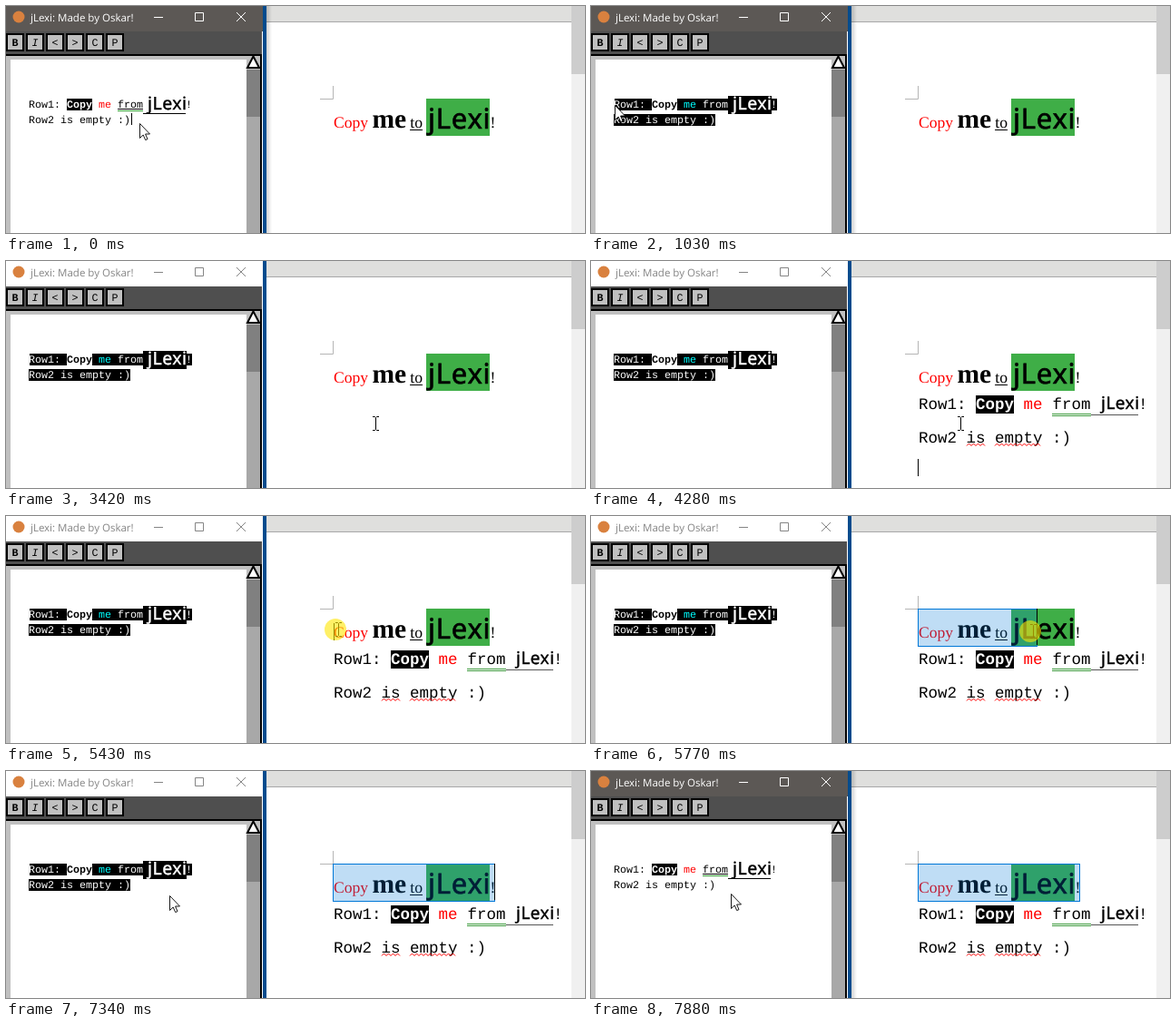
Recreate the animation shown at these times as an HTML page. Size 638x250 px, loop 8 s.

```html
<!DOCTYPE html>
<html lang="en">
<head>
<meta charset="utf-8">
<title>Copy and paste demo</title>
<style>
  html, body { margin: 0; width: 100%; height: 100%; overflow: hidden; background: #fff; }
  svg { display: block; width: 638px; height: 250px; text-rendering: geometricPrecision; }
  text { white-space: pre; }
  .ui { font-family: "Open Sans", sans-serif; font-size: 11.5px; }
  .mono { font-family: "Liberation Mono", monospace; }
  .small { font-size: 11.667px; }
  .large { font-size: 17.5px; }
  .serif { font-family: "Liberation Serif", serif; font-size: 17.6px; }
  .big { font-size: 29.5px; }
  .logo { font-family: "Noto Sans", sans-serif; stroke: #000; stroke-width: .02em; stroke-linejoin: round; letter-spacing: .025em; }
  .b { font-weight: bold; }
  .invert { fill: #fff; mix-blend-mode: difference; }
</style>
</head>
<body>
<svg id="stage" viewBox="0 0 638 250" xmlns="http://www.w3.org/2000/svg">
  <defs>
    <linearGradient id="fade">
      <stop offset="0" stop-color="#000" stop-opacity=".18"/>
      <stop offset="1" stop-color="#000" stop-opacity="0"/>
    </linearGradient>
  </defs>
  <rect width="638" height="250" fill="#fff"/>

  <!-- document window -->
  <rect x="287" width="336" height="17" fill="#dfdfdd"/>
  <rect x="287" y="17" width="336" height="1" fill="#a8a8a8"/>
  <rect x="623" width="15" height="250" fill="#f0f0f0"/>
  <rect x="623" width="15" height="75" fill="#cdcdcd"/>
  <path d="M360.5 88V102.5H346" fill="none" stroke="#b5b5b5"/>
  <rect x="463" y="102" width="70" height="41" fill="#3fae47"/>
  <g id="line">
    <text x="361" y="134" class="serif" fill="#f00">Copy</text>
    <text x="403.5" y="134" class="serif b big">me</text>
    <text x="445.3" y="134" class="serif">to</text>
    <text x="465" y="135" class="logo" font-size="31">jLexi</text>
    <text x="533.5" y="134" class="serif">!</text>
  </g>
  <rect x="445" y="136" width="14" height="1"/>
  <g id="pasted">
    <rect x="424" y="148" width="42" height="20"/>
    <g class="mono large">
      <text x="361" y="163">Row1:</text>
      <text x="424" y="163" class="b" fill="#fff">Copy</text>
      <text x="476.5" y="163" fill="#f00">me</text>
      <text x="508.5" y="163">from</text>
      <text x="603" y="163">!</text>
      <text x="361" y="200">Row2 is empty :)</text>
    </g>
    <text x="562" y="163" class="logo" font-size="19">jLexi</text>
    <path d="M508 168.5H551M508 170.5H551" stroke="#3c9a3c"/>
    <path d="M551 169.5H603" stroke="#555"/>
  </g>
  <g id="squiggles" fill="none" stroke="#f00"></g>
  <rect id="mark" y="102.5" height="41" fill="#0078d7" fill-opacity=".25" stroke="#0078d7"/>
  <rect id="docCaret" width="1"/>

  <!-- editor window -->
  <rect id="shadow" x="287" width="6" height="250" fill="url(#fade)"/>
  <rect x="283" width="4" height="250" fill="#004b8d"/>
  <rect id="titleBar" width="283" height="28"/>
  <circle cx="14" cy="12" r="6.5" fill="#d9813f"/>
  <text id="titleText" class="ui" x="27" y="16.5">jLexi: Made by Oskar!</text>
  <path id="controls" d="M163 12.5H173M208.5 7.5H217.5V16.5H208.5ZM254 7L264 17M264 7L254 17" fill="none"/>
  <rect y="28" width="282" height="25" fill="#4f4f4f"/>
  <g id="buttons"></g>
  <rect y="53" width="282" height="197"/>
  <rect y="55" width="280" height="195" fill="#c0c0c0"/>
  <rect x="5" y="59" width="260" height="191" fill="#fff"/>
  <rect x="265" y="70" width="15" height="52" fill="#808080"/>
  <rect x="265" y="122" width="15" height="128" fill="#a8a8a8"/>
  <path d="M272.5 55.5L279 68H266Z" fill="#fff" stroke="#000" stroke-width="2"/>
  <rect x="67" y="102" width="28" height="13"/>
  <g class="mono small">
    <text x="25" y="112">Row1:</text>
    <text x="67" y="112" class="b" fill="#fff">Copy</text>
    <text x="102" y="112" fill="#f00">me</text>
    <text x="123" y="112">from</text>
    <text x="198" y="112">!</text>
    <text x="25" y="129">Row2 is empty :)</text>
  </g>
  <text x="156" y="114" class="logo" font-size="19.5">jLexi</text>
  <g id="underlines">
    <path d="M123 113.5H151M151 118.5H198" stroke="#000"/>
    <path d="M123 115.5H151" stroke="#2f9a2f"/>
  </g>
  <g id="inverted"></g>
  <rect id="caret" class="invert" width="1" height="13"/>

  <!-- pointer -->
  <g id="pointer">
    <path id="arrow" d="M.5 .5V16.5L4.2 13 6.7 18.6 9 17.6 6.6 12H11.5Z" fill="#fff" stroke="#000" stroke-width=".9"/>
    <path id="beam" d="M0 -7.5H2.5L3.5 -6.5 4.5 -7.5H7M3.5 -6.5V6.5M0 7.5H2.5L3.5 6.5 4.5 7.5H7" fill="none" stroke="#000"/>
    <circle id="press" r="12" fill="#ffe600" fill-opacity=".6"/>
  </g>
</svg>
<script>
const LOOP = 8000;
const COPY_FOCUS_LOST = 2890, PASTE = 4150, DRAG = 5430, DROP = 6250, BACK = 7610;
const $ = id => document.getElementById(id);

function set(el, attrs) {
  for (const k in attrs) el.setAttribute(k, attrs[k]);
}
function add(parent, tag, attrs, text = "") {
  const el = document.createElementNS("http://www.w3.org/2000/svg", tag);
  set(el, attrs);
  el.textContent = text;
  return parent.appendChild(el);
}
const show = (el, on) => el.setAttribute("visibility", on ? "visible" : "hidden");
const within = (t, ...spans) => spans.some(([a, b]) => t >= a && t < b);
const blink = (t, since, half) => Math.floor((t - since) / half) % 2 === 0;

// toolbar
[..."BI<>CP"].forEach((label, i) => {
  const x = 1 + i * 22;
  add($("buttons"), "rect", { x, y: 31, width: 18, height: 18, fill: "#c0c0c0", stroke: "#000", "stroke-width": 2 });
  add($("buttons"), "text", {
    x: x + 9, y: 44, "text-anchor": "middle", class: "mono small",
    "font-weight": label === "B" ? "bold" : "normal", "font-style": label === "I" ? "italic" : "normal"
  }, label);
});

// spelling marks
function squiggle(from, to) {
  let d = `M${from} 203.5`;
  for (let x = from + 2.5, up = true; x <= to; x += 2.5, up = !up) d += `L${x} ${up ? 201 : 203.5}`;
  add($("squiggles"), "path", { d });
}
squiggle(414, 434);
squiggle(445, 497);

// pointer moves: start, end, x, y
const moves = [
  [70, 610, 29, 109], [829, 830, 26, 109], [1030, 1380, 103, 40],
  [2190, 2460, 303, 155], [2460, 2800, 404, 179],
  [4770, 5400, 363, 125], [DRAG, DROP, 546, 128],
  [6780, 7200, 260, 143], [7200, 7480, 154, 135]
];
function pointerAt(t) {
  let x = 147, y = 129;
  for (const [start, end, toX, toY] of moves) {
    if (t < start) break;
    const p = 1 - (1 - Math.min(1, (t - start) / (end - start))) ** 2;
    x += (toX - x) * p;
    y += (toY - y) * p;
  }
  return [x, y];
}

// glyph edges of the first document line
const edges = [361];
for (const text of $("line").children)
  for (let i = 0; i < text.getNumberOfChars(); i++) edges.push(text.getEndPositionOfChar(i).x);
const snap = x => Math.round(edges.reduce((a, b) => Math.abs(b - x) < Math.abs(a - x) ? b : a));

const bands = Array.from({ length: 4 }, () => add($("inverted"), "rect", { class: "invert" }));

function drawEditor(t, [x, y]) {
  const selected = within(t, [70, BACK]);
  const upper = selected && (t >= 610 || y < 117);
  const start = t < 830 ? Math.min(137, 25 + 7 * Math.round((x - 25) / 7)) : 25;
  const lowerStart = upper ? 25 : start;
  const rects = [
    [lowerStart, 119, selected ? 137 - lowerStart : 0, 13],
    [start, 102, upper ? 151 - start : 0, 13],
    [151, 99, upper ? 48 : 0, 20],
    [199, 102, upper ? 6 : 0, 13]
  ];
  rects.forEach(([x, y, width, height], i) => set(bands[i], { x, y, width, height }));
  show($("underlines"), !(upper && start <= 123));

  const [cx, cy] = t < 70 ? [138, 118] : t < BACK ? [25, 102] : [25, 132];
  set($("caret"), { x: cx, y: cy });
  show($("caret"), t < 70 || blink(t, 880, 1000));

  const active = !within(t, [COPY_FOCUS_LOST, BACK]);
  const ink = active ? "#fff" : "#858585";
  set($("titleBar"), { fill: active ? "#5c5855" : "#fff" });
  set($("titleText"), { fill: ink });
  set($("controls"), { stroke: ink });
  show($("shadow"), active);
}

function drawDocument(t, [x]) {
  show($("pasted"), t >= PASTE);
  show($("squiggles"), t >= PASTE + 130);

  const end = t < DRAG ? 361 : t < DROP ? snap(x) : 538;
  set($("mark"), { x: 360.5, width: end - 360 });
  show($("mark"), end > 361);

  let [cx, y, height] = [360, t < PASTE ? 143 : 218, 19];
  if (t >= DRAG) [cx, y, height] = end > 403 ? [end, 102, 40] : [end, 118, 19];
  set($("docCaret"), { x: cx, y, height });
  const since = [5940, PASTE + 130, COPY_FOCUS_LOST].find(s => t >= s);
  show($("docCaret"), since && t < BACK && blink(t, since, 530));
}

function draw(t) {
  const pos = pointerAt(t);
  drawEditor(t, pos);
  drawDocument(t, pos);
  $("pointer").setAttribute("transform", `translate(${pos.map(Math.round).join(" ")})`);
  show($("press"), within(t, [70, 1030], [1910, 1980], [2890, 2960], [5400, DROP], [BACK, 7680]));
  show($("arrow"), pos[0] < 288);
  show($("beam"), pos[0] >= 288);
}

const begin = performance.now();
function tick() {
  draw((performance.now() - begin) % LOOP);
  requestAnimationFrame(tick);
}
draw(0);
requestAnimationFrame(tick);
</script>
</body>
</html>
```
